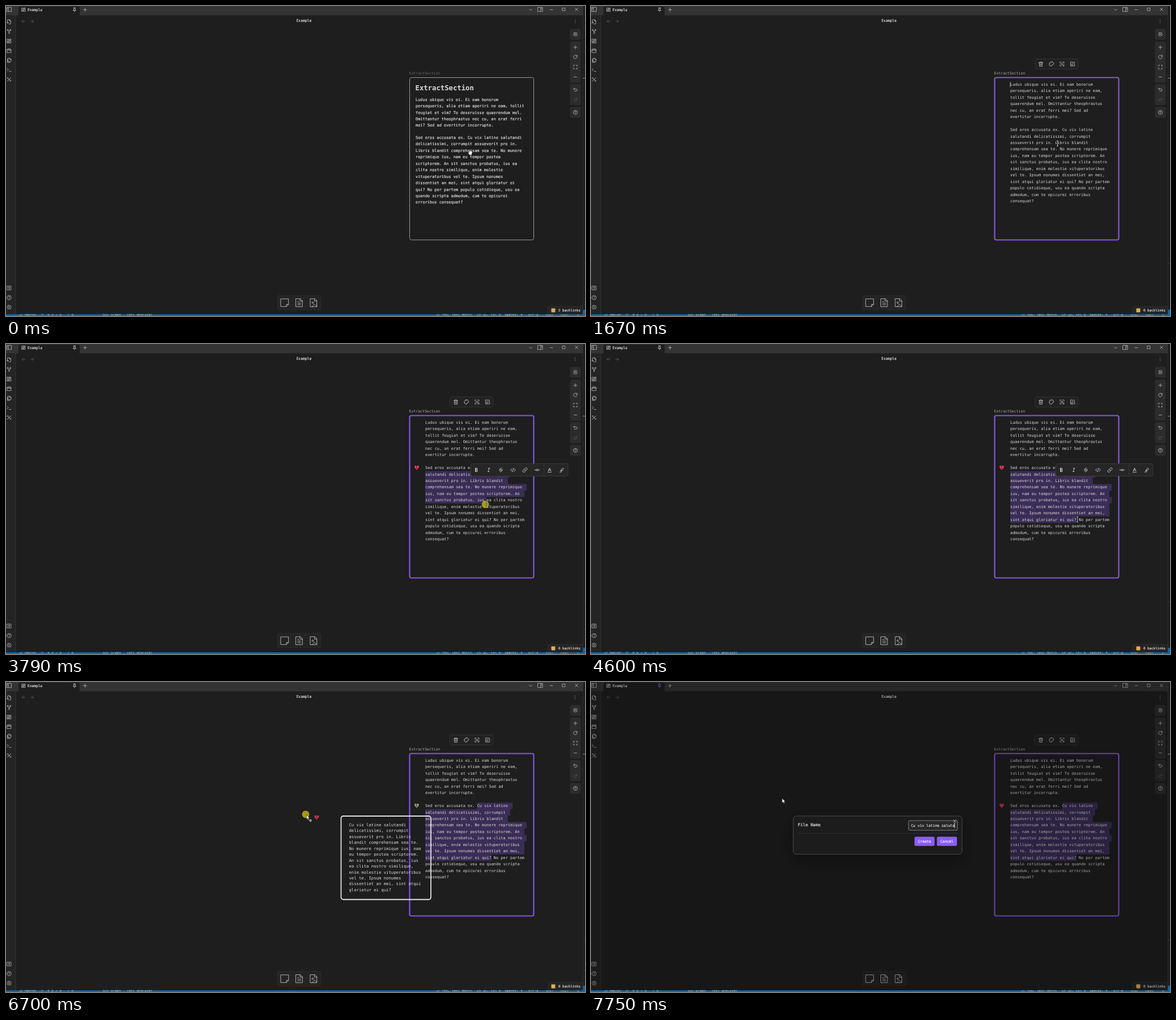
Animation, 1022 px wide and 548 px high, one loop 8 s. Source, as an HTML page:

```html
<!DOCTYPE html>
<html lang="en">
<head>
<meta charset="utf-8">
<title>Extract section</title>
<style>
  html, body { margin: 0; width: 100%; height: 100%; overflow: hidden; background: #1e1e1e; }
  svg { display: block; width: 100%; height: 100%; }
  text { font-family: "DejaVu Sans Mono", "Liberation Mono", monospace; white-space: pre; fill: #dadada; }
  .icon { fill: none; stroke-linecap: round; stroke-linejoin: round; }
  .medium { stroke: #dadada; stroke-width: .2; }
</style>
</head>
<body>
<svg id="stage" viewBox="0 0 1022 548" xmlns="http://www.w3.org/2000/svg"></svg>
<script>
const LOOP = 8000;
const CHAR = 4.175, LINE = 11.44, TEXT_X = 740, SIZE = 6.93;
const PURPLE = '#8257e6';

const intro = 'Ludus ubique vis ei. Ei eam bonorum persequeris, alia etiam aperiri ne eam, tollit feugiat et vim? ' +
  'Te deseruisse quaerendum mel. Omittantur theophrastus nec cu, an erat ferri mei? Sed ad evertitur incorrupte.';
const lead = 'Sed eros accusata ex. ';
const picked = 'Cu vix latine salutandi delicatissimi, corrumpit assueverit pro in. Libris blandit comprehensam sea te. ' +
  'No munere reprimique ius, nam eu tempor postea scriptorem. An sit sanctus probatus, ius ea clita nostro similique, ' +
  'enim molestie vituperatoribus vel te. Ipsum nonumes dissentiet an mei, sint atqui gloriatur ei qui?';
const rest = ' No per partem populo cotidieque, usu ea quando scripta admodum, cum te epicurei erroribus consequat?';
const body = lead + picked + rest;

function wrap(str, cols) {
  const lines = [''];
  for (const word of str.split(' ')) {
    const last = lines[lines.length - 1];
    if (!last) lines[lines.length - 1] = word;
    else if (last.length + 1 + word.length <= cols) lines[lines.length - 1] += ' ' + word;
    else lines.push(word);
  }
  return lines;
}

const text = (x, y, str, size, attrs = '') => `<text x="${x}" y="${y}" font-size="${size}" ${attrs}>${str}</text>`;
const para = (x, y, lines, size, step, attrs) =>
  lines.map((s, i) => text(x, (y + i * step).toFixed(2), s, size, attrs)).join('');
const rect = (x, y, w, h, fill, r = 0, attrs = '') =>
  `<rect x="${x}" y="${y}" width="${w}" height="${h}" rx="${r}" fill="${fill}" ${attrs}/>`;
const line = (d, color, w = 1) => `<path d="${d}" stroke="${color}" stroke-width="${w}" fill="none"/>`;
const group = (id, content, attrs = '') => `<g id="${id}" ${attrs}>${content}</g>`;

// Icons live on a 24 unit grid.
const icons = {
  panelLeft: 'M3 4h18v16H3zM9 4v16M5.5 8h1M5.5 11h1',
  panelRight: 'M3 4h18v16H3zM14 4v16M16.500 8h2M16.500 11h2',
  fileArrow: 'M4 11V4a2 2 0 0 1 2-2h9l5 5v13a2 2 0 0 1-2 2H11M14 2v6h6M2 16h8M6 12l-4 4 4 4',
  fork: 'M3 5a3 3 0 1 0 6 0a3 3 0 1 0-6 0M15 5a3 3 0 1 0 6 0a3 3 0 1 0-6 0M9 19a3 3 0 1 0 6 0a3 3 0 1 0-6 0M6 8q0 4 6 4q6 0 6-4M12 12v4',
  dash: 'M3 3h7v9H3zM14 3h7v5h-7zM14 12h7v9h-7zM3 16h7v5H3z',
  calendar: 'M3 5h18v16H3zM3 10h18M8 2v5M16 2v5',
  files: 'M8 2h8l5 5v11H8zM15 2v6h6M4 7v15h12',
  terminal: 'M3 17l6-6-6-6M12 19h9',
  tools: 'M4 4l16 16M20 4L4 20M3 7l4-4M17 21l4-4',
  vault: 'M3 3h18v18H3zM9 10a3 3 0 1 0 6 0a3 3 0 1 0-6 0M12 13v4',
  help: 'M2 12a10 10 0 1 0 20 0a10 10 0 1 0-20 0M9 9a3 3 0 1 1 4 3q-1 .5-1 2M12 17.500v.1',
  gear: 'M12 2l3 3 4-.5.5 4L22 12l-2.500 3.500-.5 4-4-.5-3 3-3-3-4 .5-.5-4L2 12l2.500-3.500.5-4 4 .5zM9 12a3 3 0 1 0 6 0a3 3 0 1 0-6 0',
  plus: 'M4 12h16M12 4v16',
  minus: 'M5 12h14',
  refresh: 'M20 8A9 9 0 1 0 21 13M21 3v6h-6',
  expand: 'M3 8V3h5M16 3h5v5M21 16v5h-5M8 21H3v-5',
  undo: 'M3 8h12a5 5 0 0 1 0 11H8M8 3L3 8l5 5',
  redo: 'M21 8H9a5 5 0 0 0 0 11h7M16 3l5 5-5 5',
  chevron: 'M5 9l7 7 7-7',
  square: 'M5 5h14v14H5z',
  close: 'M5 5l14 14M19 5L5 19',
  dots: 'M12 4v.1M12 12v.1M12 20v.1',
  back: 'M20 12H4M11 5l-7 7 7 7',
  forward: 'M4 12h16M13 5l7 7-7 7',
  pin: 'M12 16v6M7 3h10M9 3v7l-4 6h14l-4-6V3',
  trash: 'M3 6h18M8 6V3h8v3M5 6l1 16h12l1-16M10 11v6M14 11v6',
  palette: 'M12 2a10 10 0 1 0 0 20q3 0 2-4q0-3 4-3q4 0 4-4A10 9 0 0 0 12 2M7 12v.1M9 7v.1M15 7v.1',
  zoom: 'M3 8V3h5M16 3h5v5M21 16v5h-5M8 21H3v-5M8 12a4 4 0 1 0 8 0a4 4 0 1 0-8 0M15 15l3 3',
  edit: 'M12 3H3v18h18v-9M8 16l1-5L18 2l4 4-9 9z',
  note: 'M3 3h18v13l-5 5H3zM21 16h-5v5',
  doc: 'M4 2h11l5 5v15H4zM14 2v6h6M8 9h3M8 13h8M8 17h8',
  media: 'M4 2h11l5 5v15H4zM14 2v6h6M8 12a2 2 0 1 0 4 0a2 2 0 1 0-4 0M8 22l6-6 6 5',
  strike: 'M17 6q-2-3-6-2-4 1-3 5 1 2 4 3M4 12h16M16 14q1 5-4 6-4 0-6-3',
  code: 'M7 6l-6 6 6 6M17 6l6 6-6 6M14 4l-4 16',
  link: 'M10 14a5 5 0 0 0 7 0l4-4a5 5 0 0 0-7-7l-2 2M14 10a5 5 0 0 0-7 0l-4 4a5 5 0 0 0 7 7l2-2',
  commit: 'M8 12a4 4 0 1 0 8 0a4 4 0 1 0-8 0M1 12h7M16 12h7',
  letter: 'M6 17L12 3l6 14M8 12h8M4 22h16',
  marker: 'M9 12L17 3l4 4-8 9zM9 12l-2 5 6-1M3 21h7'
};
function icon(name, x, y, size = 9, color = '#b3b3b3', attrs = '') {
  const k = size / 24;
  return `<path class="icon" d="${icons[name]}" stroke="${color}" stroke-width="${(0.85 / k).toFixed(2)}" ` +
    `transform="translate(${x - size / 2} ${y - size / 2}) scale(${k})" ${attrs}/>`;
}
const heart = (fill, crack) =>
  `<path d="M0 3.700C-6-.6-4-3.600-2.200-3.600Q-.6-3.600 0-2.200Q.6-3.600 2.200-3.600C4-3.600 6-.6 0 3.700Z" fill="${fill}"/>` +
  (crack ? line('M0-2.500L-1-.8L.8.200L-.2 2.500', '#1e1e1e', .8) : '');

function desktop() {
  const label = (x, s) => text(x, 547.3, s, 5.85, 'fill="#d5e4ef"');
  return rect(0, 0, 1022, 548, '#1e1e1e') + rect(1018, 0, 4, 548, '#1b1b1b') +
    line('M1018.500 0V537', '#303030') + line('M1018 127.500h4', '#888') + line('M1019 455.500h3', '#333') +
    rect(0, 545, 1022, 3, '#0d68a8') + rect(1018, 537, 4, 11, '#0d68a8') +
    `<g clip-path="url(#strip)">` +
    label(23, '⎇ master  ⟳  ⊗ 0 ⚠ 0   ✓ 0') + label(171, 'Git Graph') + label(213, 'Text analyzer') +
    label(759, '⎇ You, last month') + label(831, 'Ln 32, Col 6') + label(880, 'Spaces: 4') +
    label(922, 'UTF-8') + label(953, 'CRLF') + label(979, 'Rust') + label(1008, '△') + '</g>';
}

function chrome() {
  const ribbon = { fileArrow: 28, fork: 45, dash: 62, calendar: 79, files: 96, terminal: 113, tools: 130,
    vault: 498.5, help: 515.5, gear: 532.5 };
  const side = { gear: 50, plus: 73, refresh: 90, expand: 108, minus: 125.5, undo: 148, redo: 166, help: 188 };
  return rect(0, 0, 1018, 16, '#343434') + rect(0, 16, 17, 529, '#242424') + line('M17 16V545', '#343434') +
    rect(22, 1, 108, 16, '#1e1e1e', 3) + rect(17.5, 15.9, 1000, 2, '#1e1e1e') +
    line('M0 16.200H22M130 16.200H1018', '#383838', .6) +
    Object.entries(ribbon).map(([n, y]) => icon(n, 5.5, y, 9, n === 'tools' ? '#d0d0d0' : '#b3b3b3')).join('') +
    icon('panelLeft', 5.5, 6, 11) + icon('dash', 31, 6.5, 8) + text(38, 9, 'Example', 6.25, 'class="medium"') +
    icon('pin', 121, 6.5, 8.5, '#d0d0d0', 'id="pin"') + icon('plus', 139.5, 6.5) +
    icon('chevron', 926, 6.5, 8) + icon('panelRight', 943, 6, 11) +
    icon('minus', 962.5, 6.5, 8) + icon('square', 984.5, 6, 8) + icon('close', 1007, 6, 8) +
    icon('back', 31, 27, 8, '#5c5c5c') + icon('forward', 46, 27, 8, '#5c5c5c') +
    text(512.5, 28.3, 'Example', 6.35, 'class="medium"') + icon('dots', 1004.5, 27, 8, '#d0d0d0') +
    [[41, 18], [63.5, 71.5], [138.5, 36], [179, 18]].map(([y, h]) =>
      rect(996, y, 18, h, '#2c2c2c', 2, 'stroke="#343434" stroke-width=".6"')).join('') +
    Object.entries(side).map(([n, y]) => icon(n, 1005, y, 8.5, n === 'redo' ? '#555' : '#b3b3b3')).join('') +
    rect(479.5, 511.500, 76, 25.500, '#242424', 3, 'stroke="#303030" stroke-width=".7"') +
    icon('note', 492, 524.5, 18, '#c8c8c8') + icon('doc', 517.5, 524.5, 17, '#c8c8c8') +
    icon('media', 543, 524.5, 17, '#c8c8c8') +
    `<path d="M956.500 545V534q0-3 3-3H1018V545Z" fill="#242424" stroke="#343434" stroke-width=".7"/>` +
    rect(962.5, 534.5, 7, 7, '#e0ac5b', 1) + text(975, 540.2, '2 backlinks', 5.9, 'id="links" class="medium"');
}

function cardToolbar() {
  return rect(783.5, 93.5, 76.500, 18, '#222', 3, 'stroke="#363636" stroke-width=".8"') +
    ['trash', 'palette', 'zoom', 'edit'].map((n, i) => icon(n, 794 + i * 18.7, 102.5, 9.5, '#c0c0c0')).join('');
}

function formatToolbar() {
  const names = { strike: 873.5, code: 895, link: 916, commit: 937.5, letter: 959.5, marker: 981 };
  return rect(820.5, 211.5, 171.500, 22, '#262626', 3, 'stroke="#3c3c3c" stroke-width=".9"') +
    text(827.5, 225.8, 'B', 8.6, 'font-weight="bold"') +
    text(849.5, 225.8, 'I', 8.6, 'font-style="italic"') +
    Object.entries(names).map(([n, x]) => icon(n, x, 222.7, 9.5, '#dadada')).join('') +
    line('M949.500 212V233', '#3c3c3c', .8);
}

function dialog() {
  const button = (x, s) => rect(x, 273.5, 35.500, 16.300, '#8a5cf5', 2.5) +
    text(x + 6.2, 283.700, s, 6.4, 'style="fill:#fff;stroke:#fff;stroke-width:.2"');
  return rect(357, 237, 298, 67.500, '#1e1e1e', 5, 'stroke="#464646" stroke-width="1" filter="url(#shadow)"') +
    text(365, 255.2, 'File Name', 7.45, 'class="medium"') + line('M365 267.500H647', '#343434', .8) +
    rect(560.5, 245, 86.500, 17.300, '#282828', 3, 'stroke="#606060" stroke-width="1.5"') +
    text(565, 255.700, 'Cu vix latine saluta', 6.38, 'class="medium"') + line('M641.800 249V258', '#eee', .9) +
    icon('close', 642, 246, 8.500, '#bbb') + button(571, 'Create') + button(610.5, 'Cancel');
}

const ghostCard = rect(0, 0, 158.500, 147.500, 'none', 4, 'stroke="#e4e4e4" stroke-width="1.800"') +
  para(14, 18, wrap(picked, 29), 7.28, 10.45);

const bodyLines = wrap(body, 42);
const $ = id => document.getElementById(id);
$('stage').innerHTML =
  `<defs><clipPath id="strip"><rect x="0" y="544.500" width="1022" height="4"/></clipPath>
   <filter id="shadow" x="-30%" y="-80%" width="160%" height="300%">
   <feDropShadow dx="0" dy="10" stdDeviation="14" flood-color="#000" flood-opacity=".35"/></filter></defs>` +
  desktop() + chrome() +
  text(711.5, 121, 'ExtractSection', 6.5, 'id="label"') +
  rect(712.5, 126.5, 219, 287, '#1e1e1e', 3, 'id="card"') +
  group('preview', text(722.5, 148.5, 'ExtractSection', 12.25, 'font-weight="bold"') +
    para(723, 167.7, wrap(intro, 46), SIZE, LINE, 'class="medium"') +
    para(723, 235, wrap(body, 46), SIZE, LINE, 'class="medium"')) +
  group('editor', `<path id="selection" fill="#3a2d56"/>` +
    para(TEXT_X, 141, wrap(intro, 42), SIZE, LINE) + para(TEXT_X, 221.1, bodyLines, SIZE, LINE)) +
  `<path id="caret" d="M740 134V143.500" stroke="#ddd" stroke-width=".8"/>` +
  group('heart', heart('#f0365f', true), 'transform="translate(725 218.700)"') +
  group('heartDrag', heart('#98996a', true), 'transform="translate(725 218.700)"') +
  group('heartFull', heart('#c02f55', false), 'transform="translate(725 218.700)"') +
  group('tools', cardToolbar()) + group('format', formatToolbar()) +
  group('ghost', ghostCard) + group('ghostHeart', heart('#cf3158', true)) +
  group('modal', rect(0, 0, 1018, 545, '#000', 0, 'opacity=".25"') + dialog()) +
  `<circle id="press" r="6.500" fill="#c4bc10" opacity=".8"/>` +
  group('hand', `<path d="M-2.500-1.500Q-2.200-3-1.200-2.200Q-.6-4 .5-2.500Q1.400-3.800 2-2.200Q3.600-2.800 3.400-.5Q3.400 2 2.200 4.500H-1.500Q-3 2-4 .500Q-3.600-.8-2.200.4Z" fill="#fff" stroke="#111" stroke-width=".6"/>`) +
  group('beam', line('M-1.500-4.500H1.500M0-4.500V4.500M-1.500 4.500H1.500', '#111', 1.6) +
    line('M-1.500-4.500H1.500M0-4.500V4.500M-1.500 4.500H1.500', '#ddd', .8)) +
  group('arrow', `<path d="M0 0V8L1.900 6.300L3.200 9.200L4.600 8.600L3.300 5.700H5.800Z" fill="#fff" stroke="#111" stroke-width=".6"/>` +
    group('copy', rect(2.5, 6.5, 4, 3.500, 'none', 0, 'stroke="#bbb" stroke-width=".5" stroke-dasharray="1 .8"') +
      rect(5.5, 8.300, 3.500, 3.500, '#ddd') + line('M6 10H8.500M7.250 8.800V11.200', '#222', .6)));

// Rows are time, x, y.
const pointer = [
  [0, 820, 258], [1000, 820, 258], [1130, 822.5, 243], [1850, 822.5, 243], [2290, 828.5, 218.5],
  [2870, 828.5, 218.5], [3670, 843, 270], [3790, 847, 284], [4470, 857.5, 310], [5000, 857.5, 310],
  [5760, 728.5, 217.5], [6300, 728.5, 217.5], [6420, 685, 224], [6700, 530.5, 234.5],
  [6890, 424, 227], [6990, 368, 215], [7130, 341, 207], [7240, 337, 205.5]
];
const ghostGap = [[6330, 52, 9], [6700, 62.5, 3], [6890, 59, 6], [6990, 55, 9], [7240, 53, 9]];
const smooth = new Set([1000, 1850, 5000]);

function track(rows, t) {
  let i = rows.findIndex(r => r[0] > t);
  if (i === 0) return rows[0].slice(1);
  if (i < 0) return rows[rows.length - 1].slice(1);
  const [a, b] = [rows[i - 1], rows[i]];
  let u = (t - a[0]) / (b[0] - a[0]);
  if (smooth.has(a[0])) u = u * u * (3 - 2 * u);
  return [a[1] + (b[1] - a[1]) * u, a[2] + (b[2] - a[2]) * u];
}
const within = (t, a, b) => t >= a && t < b;
const show = (id, on) => $(id).setAttribute('visibility', on ? 'visible' : 'hidden');
const place = (id, x, y) => $(id).setAttribute('transform', `translate(${x.toFixed(2)} ${y.toFixed(2)})`);
const fade = (id, v) => $(id).setAttribute('opacity', Math.max(0, Math.min(1, v)));

function selectionPath(t) {
  if (t < 2870) return '';
  const [x, y] = track(pointer, Math.min(t, 4570));
  const lastRow = Math.max(0, Math.min(8, Math.floor((y - 216) / LINE)));
  const col = Math.round((x + 1 - TEXT_X) / CHAR);
  let d = '';
  for (let row = 0; row <= lastRow; row++) {
    const left = TEXT_X + (row ? 0 : lead.length * CHAR);
    const right = row === lastRow ? TEXT_X + col * CHAR : TEXT_X + bodyLines[row].length * CHAR + 8;
    const top = 213.200 + row * LINE;
    if (right > left) d += `M${left} ${top}H${right}V${top + LINE}H${left}Z`;
  }
  return d;
}

function render(t) {
  const selected = t >= 300, editing = t >= 1590, modal = t >= 7540;
  const dragging = within(t, 6330, 7280);
  const [x, y] = track(pointer, t);

  const card = $('card');
  card.setAttribute('stroke', selected ? PURPLE : '#999');
  card.setAttribute('stroke-width', selected ? 2.2 : 1);
  $('label').style.fill = selected ? '#aaa' : '#666';
  $('links').textContent = (t < 1060 ? '2' : '0') + ' backlinks';
  $('pin').setAttribute('stroke', modal ? '#8a5cf5' : '#d0d0d0');

  show('preview', !editing);
  show('editor', editing);
  show('caret', within(t, 1590, 2650));
  $('selection').setAttribute('d', selectionPath(t));
  fade('tools', (t - 300) / 140);
  show('format', within(t, 3250, 6330));

  show('heart', within(t, 1900, 6330));
  show('heartDrag', within(t, 6330, 7540));
  show('heartFull', modal);

  const [dx, dy] = track(ghostGap, t);
  show('ghost', dragging);
  show('ghostHeart', dragging);
  place('ghost', x - 1 + dx, y - .5 + dy);
  place('ghostHeart', x + 18.500, y + 5);

  show('modal', modal);
  fade('modal', (t - 7520) / 120);

  const pressed = within(t, 270, 400) || within(t, 1300, 1420) || within(t, 2650, 4585) || within(t, 6130, 7270);
  show('press', pressed);
  place('press', x - 1, y - .5);
  show('hand', !editing);
  show('beam', editing && t < 5690);
  show('arrow', t >= 5690);
  show('copy', dragging);
  place('hand', x - .5, y + 1);
  place('beam', x + 1, y);
  place('arrow', x + .3, y + .3);
}

const start = performance.now();
function tick() {
  render((performance.now() - start) % LOOP);
  requestAnimationFrame(tick);
}
tick();
</script>
</body>
</html>
```
